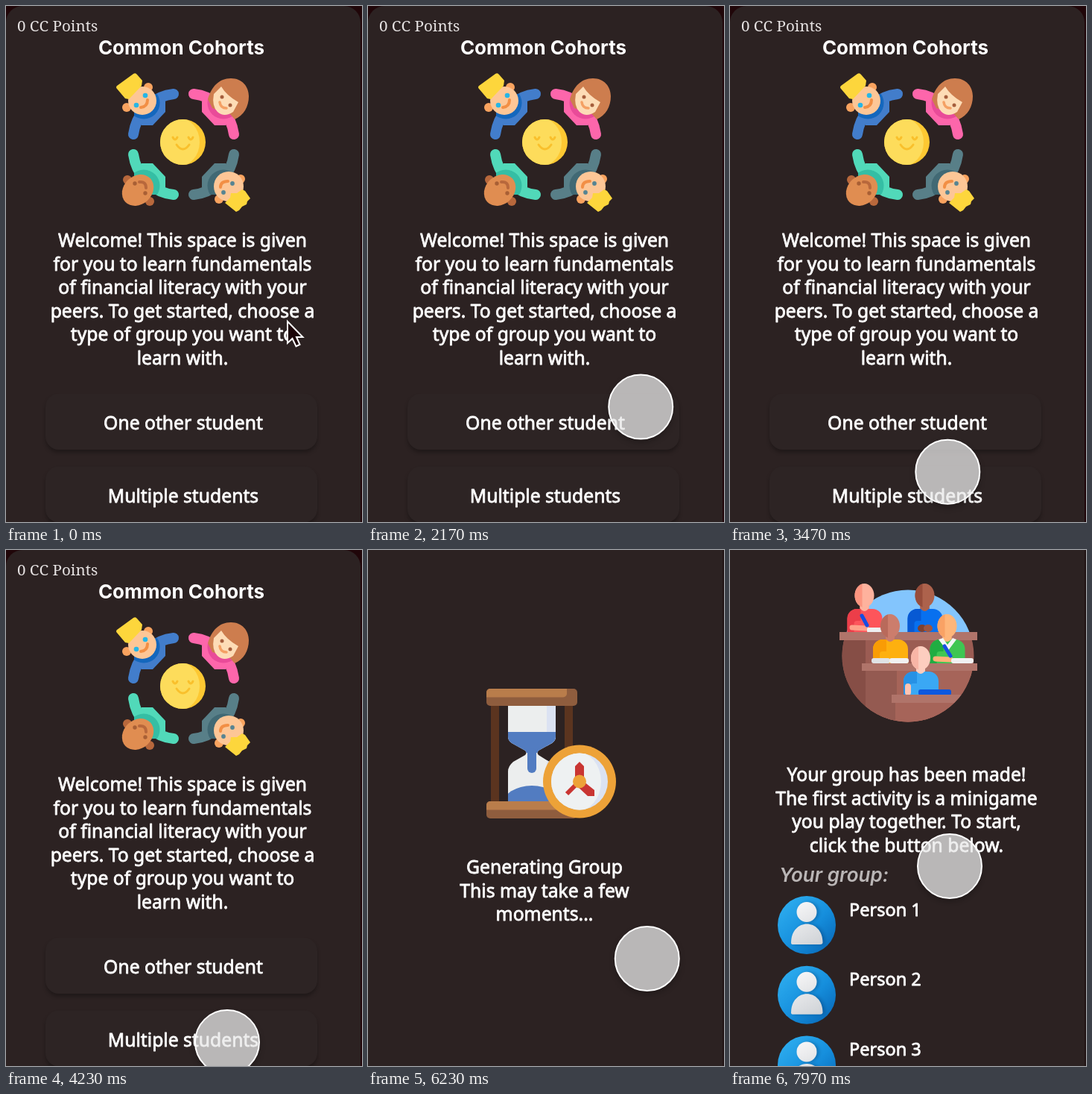
Write an HTML page with a canvas that moves like this. It is 478x692 px and loops after 8 s.

```html
<!DOCTYPE html>
<html lang="en">
<head>
<meta charset="utf-8">
<title>Study group</title>
<style>
html, body { margin: 0; width: 100%; height: 100%; overflow: hidden; background: #2c2222; }
canvas { display: block; width: 478px; height: 692px; }
</style>
</head>
<body>
<canvas id="stage" width="478" height="692"></canvas>
<script>
const W = 478, H = 692, LOOP = 8000;
const ctx = document.getElementById('stage').getContext('2d');
const BG = '#2c2222', SANS = '"Noto Sans", "Open Sans", sans-serif', INTER = 'Inter, Roboto, sans-serif';

// ---- drawing helpers ----
function fillPath(color, build) {
  ctx.beginPath();
  build();
  ctx.fillStyle = color;
  ctx.fill();
}
const circle = (x, y, r, color) => fillPath(color, () => ctx.arc(x, y, r, 0, 7));
const oval = (x, y, rx, ry, color, turn = 0) => fillPath(color, () => ctx.ellipse(x, y, rx, ry, turn, 0, 7));
const box = (x, y, w, h, color, r = 0) => fillPath(color, () => ctx.roundRect(x, y, w, h, r));
const poly = (color, pts) => fillPath(color, () => pts.forEach(p => ctx.lineTo(p[0], p[1])));
const shape = (color, d) => { ctx.fillStyle = color; ctx.fill(new Path2D(d)); };
function line(color, width, d, cap = 'round') {
  ctx.strokeStyle = color;
  ctx.lineWidth = width;
  ctx.lineCap = cap;
  ctx.stroke(new Path2D(d));
}
function text(str, x, y, font, color = '#fff', align = 'center') {
  ctx.font = font;
  ctx.fillStyle = color;
  ctx.textAlign = align;
  ctx.fillText(str, x, y);
}
// Regular weight thickened by a hairline gives a medium weight
function medium(str, x, y, size = 24.7, align = 'center') {
  text(str, x, y, `400 ${size}px ${SANS}`, '#fff', align);
  ctx.strokeStyle = '#fff';
  ctx.lineWidth = .8;
  ctx.lineJoin = 'round';
  ctx.strokeText(str, x, y);
}
const paragraph = (lines, y) => lines.forEach((s, i) => medium(s, 237, y + i * 31.6));
function clipped(build, draw) {
  ctx.save();
  ctx.beginPath();
  build();
  ctx.clip();
  draw();
  ctx.restore();
}

// ---- first screen ----
function torso(color, collar, flipX, flipY) {
  ctx.save();
  ctx.translate(flipX ? 477 : 0, flipY ? 371 : 0);
  ctx.scale(flipX ? -1 : 1, flipY ? -1 : 1);
  line(color, 14, 'M225 118 Q206 120 193 132 M171 172 Q174 152 186 139');
  poly(color, [[192, 122], [206, 122], [214, 128], [214, 142], [197, 160], [182, 160], [174, 150]]);
  clipped(() => ctx.rect(172, 118, 45, 45), () => circle(185, 130, 21.5, collar));
  ctx.restore();
}

function friends() {
  torso('#427dcb', '#1467bd', false, false);
  circle(162, 136, 6, '#f9a35f');
  circle(191, 109, 6, '#f9a35f');
  circle(183, 127, 19, '#fdc696');
  shape('#fdd63c', 'M149 107 L171 91 Q174 89 176 92 L183 100 L182 107 L165 125 L160 124 L149 111 Q147 109 149 107 Z');
  circle(175, 133, 3.3, '#27b6e6');
  circle(187, 120, 3.3, '#27b6e6');
  line('#f28f45', 4, 'M181 136 Q190 135 190 126');

  torso('#fd66ab', '#e94b99', true, false);
  shape('#cd7d4e', 'M271 125 C276 108 286 97 302 97 C317 97 326 108 326 121 C326 135 319 147 307 152 L300 144 L277 137 Z');
  shape('#fddcb6', 'M279 118 L289 108 Q296 120 312 129 L305 142 Q293 150 284 142 Q276 134 279 118 Z');
  circle(290, 122, 2.5, '#a65e3d');
  circle(301, 133, 2.5, '#a65e3d');
  line('#f4a064', 3.5, 'M287 129 Q288 137 296 137');

  torso('#51d9b9', '#35bea4', false, true);
  circle(163, 233, 6, '#b8683c');
  circle(193, 262, 6, '#b8683c');
  oval(177, 247, 23, 19, '#e08d51', -0.75);
  circle(173, 238, 2.7, '#a85f35');
  circle(187, 251, 2.7, '#a85f35');
  line('#b8683c', 4, 'M179 236 Q188 235 188 244');

  torso('#587f88', '#416974', true, true);
  circle(315, 232, 6, '#f9a35f');
  circle(286, 259, 6, '#f9a35f');
  circle(299, 242, 20, '#fdc696');
  shape('#fdd63c', 'M294 264 L301 257 L302 251 L310 251 L317 246 L321 248 L328 258 L324 262 L323 266 L317 269 L313 274 L309 276 Z');
  circle(292, 250, 2.9, '#578492');
  circle(304, 238, 2.9, '#578492');
  line('#f28f45', 4, 'M288 243 Q288 235 298 235');

  circle(237.5, 182.5, 30.5, '#fdc832');
  clipped(() => ctx.arc(237.5, 182.5, 30.5, 0, 7), () => oval(231, 182.5, 29, 33, '#fddc5b'));
  line('#f9c02c', 3, 'M224 176 Q227 182 230 176 M245 176 Q248 182 251 176 M229 186 Q237.5 198 246 186');
}

function button(y, label) {
  ctx.save();
  ctx.shadowColor = 'rgba(0,0,0,.28)';
  ctx.shadowBlur = 5;
  ctx.shadowOffsetY = 4;
  box(53, y, 365, 75, '#2d2424', 18);
  ctx.restore();
  medium(label, 238, y + 48);
}

function welcome() {
  box(0, 0, W, H, '#200609');
  box(0, 0, 476, 740, BG, 22);
  text('0 CC Points', 15, 33.5, '300 20.6px "Noto Serif", serif', '#e6e2e2', 'left');
  text('Common Cohorts', 235.5, 65, `700 26px ${INTER}`);
  friends();
  paragraph(['Welcome! This space is given', 'for you to learn fundamentals', 'of financial literacy with your',
    'peers. To get started, choose a', 'type of group you want to', 'learn with.'], 323);
  button(520, 'One other student');
  button(617.5, 'Multiple students');
}

// ---- waiting screen ----
function plain() {
  box(0, 0, W, H, BG);
  box(476, 0, 2, H, '#211314');
}

function bar(y) {
  box(159, y, 122, 23, '#8f5d3e', 5);
  box(159, y, 108, 11.5, '#b97d4b', [5, 0, 5, 0]);
}

function hourglass() {
  box(165, 207, 11, 132, '#5b341f');
  box(264, 207, 11, 132, '#5b341f');
  const glass = 'M188 208 H252 V250 Q252 256 247 259 L229 269 Q226 272 229 275 L245 285 Q252 290 252 297 V338 H188 V297 Q188 290 195 284 L211 275 Q214 272 211 269 L193 259 Q188 256 188 250 Z';
  shape('#eceeee', glass);
  ctx.save();
  ctx.clip(new Path2D(glass));
  box(240, 208, 12, 130, '#dbe2f2');
  box(188, 244, 64, 28, '#527cc1');
  oval(220, 341, 39, 25, '#527cc1');
  ctx.restore();
  box(214, 266, 12, 33, '#527cc1', 6);
  bar(186);
  bar(337);
}

function clock() {
  circle(284, 310.5, 49, '#eda238');
  circle(284, 310.5, 38, '#dbe2f2');
  clipped(() => ctx.arc(284, 310.5, 38, 0, 7), () => oval(278, 310.5, 35, 41, '#eef1f2'));
  poly('#c93532', [[278, 310], [278, 290], [284, 284], [290, 290], [290, 310]]);
  poly('#c93532', [[289, 310], [304, 322], [304, 330], [295, 330], [280, 316]]);
  line('#c93532', 6, 'M284 310 L267 327', 'butt');
  circle(284, 310.5, 9, '#eda238');
}

function waiting() {
  plain();
  hourglass();
  clock();
  paragraph(['Generating Group', 'This may take a few', 'moments...'], 434);
}

// ---- group screen ----
function pupil(x, y, skin, shade, shirt, dark) {
  box(x - 6, y + 9, 12, 17, shade, 4);
  box(x - 23, y + 18, 47, 34, shirt, [13, 13, 0, 0]);
  box(x - 23, y + 18, 18, 34, dark, [13, 0, 0, 0]);
  box(x - 14, y + 34, 28, 18, shirt, 4);
  shape(skin, `M${x - 6} ${y + 10} H${x + 6} V${y + 17} Q${x} ${y + 25} ${x - 6} ${y + 17} Z`);
  oval(x, y, 13, 16, skin);
  clipped(() => ctx.rect(x - 14, y - 17, 11, 34), () => oval(x, y, 13, 16, shade));
}

const desk = (x, y, w, h) => box(x, y, w, h, '#b0746a');
const inDisc = draw => clipped(() => ctx.arc(239, 142, 88.5, 0, 7), draw);

function classroom() {
  inDisc(() => {
    box(147, 50, 186, 65, '#83c5fd');
    box(147, 115, 186, 120, '#9b5c53');
    box(147, 115, 35, 120, '#864e46');
  });
  pupil(180.5, 61, '#feb29d', '#fc9580', '#fd555b', '#ec3e49');
  line('#fea18a', 7, 'M164 104 L183 105');
  line('#164ee2', 5, 'M177 88 L184 101');
  box(184, 104, 20, 7, '#eef0f2', 2);
  pupil(261.5, 61, '#ad624c', '#974d3b', '#0870ef', '#0759d3');
  oval(258, 105, 6, 5, '#7d4131');
  oval(266, 105, 6, 5, '#9c5541');
  desk(147, 110, 185, 11);
  pupil(215, 102, '#cc7d6c', '#b96a5b', '#feb00f', '#f99c05');
  box(190, 145, 25, 7, '#e0e2e6', 3);
  box(214, 145, 26, 7, '#f1f1f2', 3);
  pupil(291.5, 102, '#feb67a', '#f9a265', '#3fc653', '#20ad42');
  poly('#f3f5f5', [[280, 120], [286, 118], [292, 127], [299, 118], [304, 120], [292, 136]]);
  line('#fdb278', 7, 'M276 146 L296 147');
  line('#164ee2', 5, 'M288 129 L296 142');
  box(297, 145, 30, 7, '#f1f1f2', 3);
  inDisc(() => {
    box(182, 162, 150, 70, '#a66459');
    box(182, 162, 42, 70, '#945a51');
  });
  desk(177, 152, 155, 10);
  pupil(256, 145, '#fdcdbf', '#f8b5a6', '#3aa8f4', '#2791e5');
  line('#fcc3b3', 8, 'M239 183 L239 191');
  box(253, 187, 44, 8, '#0d58df', 3);
  inDisc(() => {
    box(222, 205, 110, 30, '#a66459');
    desk(217, 194, 115, 11);
  });
}

function member(i) {
  const y = 503 + i * 93.7;
  const sky = ctx.createLinearGradient(70, y - 35, 135, y + 35);
  sky.addColorStop(0, '#2faff0');
  sky.addColorStop(.55, '#168fdd');
  sky.addColorStop(1, '#0869b8');
  circle(103, y, 39, sky);
  const clay = ctx.createLinearGradient(88, y - 30, 118, y + 26);
  clay.addColorStop(0, '#f7f7f8');
  clay.addColorStop(1, '#d0d3d7');
  ctx.save();
  ctx.shadowColor = 'rgba(0,45,95,.35)';
  ctx.shadowBlur = 5;
  ctx.shadowOffsetX = 3;
  circle(103, y - 17.5, 13.5, clay);
  shape(clay, `M82 ${y + 24} C82 ${y - 10} 124.5 ${y - 10} 124.5 ${y + 24} Q124 ${y + 26} 121 ${y + 26} H85 Q82 ${y + 26} 82 ${y + 24} Z`);
  ctx.restore();
  medium('Person ' + (i + 1), 160, y - 12.5, 23.5, 'left');
}

function group() {
  plain();
  classroom();
  paragraph(['Your group has been made!', 'The first activity is a minigame',
    'you play together. To start,', 'click the button below.'], 310);
  text('Your group:', 66, 445, `italic 600 26px ${INTER}`, '#bab6b6', 'left');
  for (let i = 0; i < 3; i++) member(i);
}

// ---- pointer ----
function arrow([x, y]) {
  ctx.save();
  ctx.translate(x + 1, y + 2);
  ctx.lineJoin = 'miter';
  const d = 'M0 0 L0 29 L6.5 23 L11.5 33.5 L16.5 31 L12 21 H20.5 Z';
  shape('#1b0508', d);
  line('#fff', 2, d);
  ctx.restore();
}

function touch([x, y]) {
  ctx.save();
  ctx.beginPath();
  ctx.rect(0, 0, W, H);
  ctx.arc(x, y, 43, 0, 2 * Math.PI);
  ctx.clip('evenodd');
  ctx.shadowColor = 'rgba(0,0,0,.3)';
  ctx.shadowBlur = 8;
  ctx.shadowOffsetY = 4;
  circle(x, y, 43, '#000');
  ctx.restore();
  circle(x, y, 43, 'rgba(233,232,232,.75)');
  ctx.beginPath();
  ctx.arc(x, y, 43, 0, 7);
  ctx.strokeStyle = '#fff';
  ctx.lineWidth = 2;
  ctx.stroke();
}

// Each stop: time, x, y
const ARROW = [[200, 377, 421], [950, 367, 568]];
const TOUCH = [[1950, 370, 572], [2650, 354, 426], [2830, 354, 426], [3330, 289, 600], [3650, 297, 660],
  [5020, 297, 660], [5380, 236, 584], [5480, 236, 584], [5830, 290, 550], [6300, 380, 548],
  [7250, 380, 548], [7900, 295, 424]];

function along(stops, t) {
  const next = stops.findIndex(s => s[0] > t);
  if (next <= 0) return stops[next ? stops.length - 1 : 0].slice(1);
  const [t0, x0, y0] = stops[next - 1], [t1, x1, y1] = stops[next];
  const u = (t - t0) / (t1 - t0), e = u * u * (3 - 2 * u);
  return [x0 + (x1 - x0) * e, y0 + (y1 - y0) * e];
}

function draw() {
  const t = performance.now() % LOOP;
  (t < 4600 ? welcome : t < 6900 ? waiting : group)();
  if (t < 1750) arrow(along(ARROW, t));
  else touch(along(TOUCH, t));
  requestAnimationFrame(draw);
}
draw();
</script>
</body>
</html>
```
